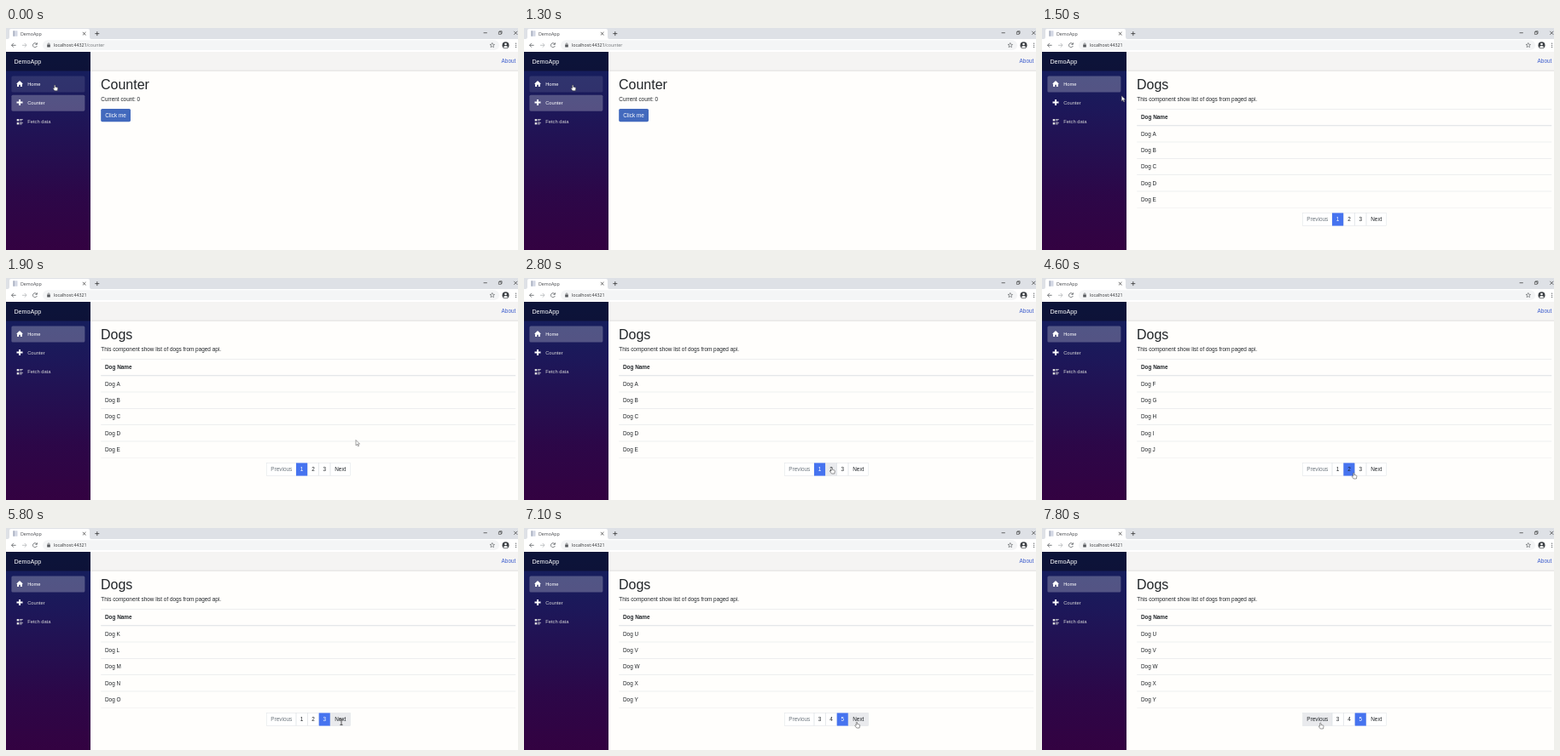
These frames come from a looping animation (600 px wide and 261 px high, 8000 ms). An HTML page with a canvas:

```html
<!DOCTYPE html>
<html lang="en">
<head>
<meta charset="utf-8">
<title>Dogs</title>
<style>
html, body { margin: 0; width: 100%; height: 100%; overflow: hidden; background: #fffefc; }
canvas { display: block; width: 600px; height: 261px; }
</style>
</head>
<body>
<canvas id="stage"></canvas>
<script>
const W = 600, H = 261, LOOP = 8000, STEP = 100;
const UI = '"Open Sans", "Noto Sans", sans-serif';
const SANS = '"Liberation Sans", Arial, sans-serif';
const INK = '#212529';
const canvas = document.getElementById('stage');
const ctx = canvas.getContext('2d');
const dpr = window.devicePixelRatio || 1;
canvas.width = W * dpr;
canvas.height = H * dpr;

// [time, page]; page 0 is the counter
const pages = [[0, 0], [1400, 1], [3000, 2], [5200, 3], [6000, 4], [6400, 5]];

// [time, x, y, pointer shape from here on]
const route = [
  [0, 56.5, 66.8, 'hand'], [1400, 56.5, 66.8, 'arrow'],
  [1900, 410, 190.5, 'arrow'], [2600, 360, 223, 'hand'],
  [3000, 360, 223, 'arrow'], [3400, 375, 233, 'arrow'],
  [3700, 371.5, 230, 'arrow'], [4100, 379, 233, 'hand'],
  [4600, 364.6, 229, 'hand'], [5100, 373, 226, 'hand'],
  [5300, 373, 226, 'hand'], [5600, 393, 228, 'ibeam'],
  [7000, 393, 228, 'hand'], [7700, 325.7, 229, 'hand'],
  [LOOP, 325.7, 229, 'hand']
];

function rect(x, y, w, h, fill, r = 0) {
  ctx.fillStyle = fill;
  ctx.beginPath();
  ctx.roundRect(x, y, w, h, r);
  ctx.fill();
}

function text(s, x, y, size, color, font = SANS, weight = 400) {
  ctx.font = `${weight} ${size}px ${font}`;
  ctx.fillStyle = color;
  ctx.fillText(s, x, y);
}

function stroke(d, color, width = 0.8) {
  ctx.strokeStyle = color;
  ctx.lineWidth = width;
  ctx.stroke(new Path2D(d));
}

function fill(d, color) {
  ctx.fillStyle = color;
  ctx.fill(new Path2D(d));
}

function dot(x, y, r, color) {
  rect(x - r, y - r, 2 * r, 2 * r, color, r);
}

function pageAt(t) {
  return pages.filter(p => p[0] <= t).pop()[1];
}

function pointerAt(t) {
  const i = route.findIndex(k => k[0] > t) - 1;
  const [t0, x0, y0, shape] = route[i];
  const [t1, x1, y1] = route[i + 1];
  const u = (t - t0) / (t1 - t0);
  const e = u * u * (3 - 2 * u);
  return { x: x0 + (x1 - x0) * e, y: y0 + (y1 - y0) * e, shape };
}

function browser(path) {
  rect(0, 0, W, 13, '#dee1e6');
  fill('M2 13Q4 13 4 10V3Q4 1 6 1H96Q98 1 98 3V10Q98 13 100 13Z', '#fff');
  rect(8.5, 3.3, 5, 6.4, '#d3d8e4', 0.5);
  rect(8.5, 3.3, 1.2, 6.4, '#9aa3b5');
  text('DemoApp', 17, 8.6, 5.3, '#45484c', UI);
  stroke('M89.9 4.8l3.6 3.6m0-3.6l-3.6 3.6', '#444');
  stroke('M104.3 6.6h5m-2.5-2.5v5', '#333');
  stroke('M559.6 5.7h4.2', '#333', 0.7);
  stroke('M577.4 4.6h2.8v2.8h-2.8zM578.3 4.6v-0.9h2.8v2.8h-0.9', '#333', 0.6);
  stroke('M595.3 3.8l4 4m0-4l-4 4', '#333', 0.7);

  rect(0, 13, W, 15, '#fff');
  rect(43, 14.3, 535, 11.8, '#f4f5f6', 5.9);
  stroke('M11.6 20.3h-5m2.3-2.4l-2.4 2.4l2.4 2.4', '#55585c');
  stroke('M19 20.3h5m-2.3-2.4l2.4 2.4l-2.4 2.4', '#b3b5b8');
  stroke('M36.1 18.9a2.5 2.5 0 1 0 0.2 2.2M36.4 17.3v2h-2', '#55585c');
  rect(48.2, 19.6, 3.6, 3, '#55585c', 0.4);
  stroke('M49 19.8v-1a1 1 0 0 1 2 0v1', '#55585c', 0.6);
  text('localhost:44321', 56, 22.2, 5.25, '#2c2e31', UI);
  if (path) {
    const w = ctx.measureText('localhost:44321').width;
    text(path, 56 + w, 22.2, 5.25, '#6d7074', UI);
  }
  stroke('M569.8 17.4l0.8 1.9l2 0.1l-1.6 1.3l0.5 2l-1.7-1.1l-1.7 1.1l0.5-2l-1.6-1.3l2-0.1z', '#5a5d61', 0.6);
  dot(585.5, 20.3, 4, '#3c4045');
  dot(585.5, 19, 1.3, '#fff');
  fill('M583 22.7q0-1.7 2.5-1.7t2.5 1.7q-2.5 1.7-5 0z', '#fff');
  for (const y of [18.2, 20.3, 22.4]) dot(597.6, y, 0.6, '#55585c');
}

function sidebar(active, homeHover) {
  const g = ctx.createLinearGradient(0, 28, 0, H);
  g.addColorStop(0, '#13215f');
  g.addColorStop(0.3, '#1d1759');
  g.addColorStop(0.72, '#2c0748');
  g.addColorStop(1, '#330241');
  rect(0, 28, 99, H - 28, g);
  rect(0, 28, 99, 22.4, 'rgba(0,0,0,.4)');
  text('DemoApp', 9.4, 41.5, 7.2, '#fff');

  if (homeHover) rect(6.4, 56.5, 86, 19, 'rgba(255,255,255,.1)', 1.6);
  rect(6.4, 56.5 + 22.2 * active, 86, 19, 'rgba(255,255,255,.25)', 1.6);
  ['Home', 'Counter', 'Fetch data'].forEach((label, i) => {
    const on = i === active || (i === 0 && homeHover);
    text(label, 25.2, 68 + 22.1 * i, 5.76, on ? '#fff' : '#d7d7d7');
  });
  fill('M16 62l4 3.8h-1.1v3.3h-2v-2.3h-1.8v2.3h-2v-3.3H12z', '#fff');
  stroke('M12.5 87.6h7m-3.5-3.5v7', '#fff', 2);
  for (const y of [107, 111]) {
    rect(12.7, y, 2.6, 2.5, '#ddd');
    rect(16.1, y, 3.6, 0.8, '#ddd');
    rect(16.1, y + 1.6, 2.6, 0.8, '#ddd');
  }
}

function counter() {
  text('Counter', 111, 72.4, 16, INK);
  text('Current count: 0', 111.3, 86.2, 6.4, INK);
  rect(111.2, 95, 34.8, 15.2, '#4269bd', 1.6);
  text('Click me', 116.3, 104.7, 6.4, '#fff');
}

function dogs(page, ptr) {
  text('Dogs', 111, 72.4, 16, INK);
  text('This component show list of dogs from paged api.', 111.3, 86.2, 6.4, INK);
  text('Dog Name', 116, 107.1, 6.4, INK, SANS, 700);
  for (let i = 0; i < 7; i++) {
    rect(111.2, 95 + 19.35 * i, 486, i === 1 ? 0.8 : 0.5, i === 6 ? '#ecedee' : '#dcdfe3');
  }
  for (let i = 0; i < 5; i++) {
    const letter = String.fromCharCode(65 + (page - 1) * 5 + i);
    text('Dog ' + letter, 116, 126.8 + 19.3 * i, 6.4, INK);
  }
  pager(page, ptr);
}

function pager(page, ptr) {
  const first = Math.max(1, page - 2);
  const edges = [305.6, 340, 353.3, 366.7, 380, 403.6];
  const labels = ['Previous', first, first + 1, first + 2, 'Next'];
  const top = 217.4, high = 15.2;
  rect(305.6, top, 98, high, '#fff', 1.6);
  ctx.textAlign = 'center';
  labels.forEach((label, i) => {
    const x = edges[i], w = edges[i + 1] - x;
    const over = ptr.x >= x && ptr.x < x + w && ptr.y >= top && ptr.y < top + high;
    const on = label === page;
    if (on) rect(x, top, w, high, '#4673ef');
    else {
      if (over) rect(x, top, w, high, '#e9eaed');
      ctx.strokeStyle = '#dee2e6';
      ctx.lineWidth = 0.5;
      ctx.strokeRect(x, top, w, high);
    }
    const color = over ? INK : on ? '#fff' : i ? INK : '#6c757d';
    text(label, x + w / 2, 227.3, 6.4, color);
  });
  ctx.textAlign = 'left';
}

const shapes = {
  arrow() {
    const d = 'M0 0V6.3L1.5 5L2.5 7.3L3.5 6.9L2.5 4.6H4.5Z';
    fill(d, '#fff');
    stroke(d, '#444', 0.5);
  },
  hand() {
    const d = 'M0 0.5Q0.7-0.3 1.3 0.5V2.5L3.6 3Q4.4 3.2 4.3 4.2L3.8 7H0.5L-1.5 4.3Q-1.2 3.4 0 4.1Z';
    fill(d, '#fff');
    stroke(d, '#333', 0.5);
  },
  ibeam() {
    stroke('M-1.6-3H1.6M0-3V3.4M-1.6 3.4H1.6', '#333', 0.8);
  }
};

function draw(t) {
  const page = pageAt(t), ptr = pointerAt(t);
  ctx.setTransform(dpr, 0, 0, dpr, 0, 0);
  rect(0, 0, W, H, '#fffefc');
  browser(page ? '' : '/counter');
  rect(99, 28, W - 99, 22, '#f5f4f3');
  rect(99, 49.8, W - 99, 0.6, '#d6d5d5');
  text('About', 580.6, 41.2, 6.4, '#3b5ccd');
  sidebar(page ? 0 : 1, !page);
  if (page) dogs(page, ptr);
  else counter();
  ctx.translate(ptr.x, ptr.y);
  shapes[ptr.shape]();
}

const start = performance.now();
function tick() {
  const t = (performance.now() - start) % LOOP;
  draw(Math.floor(t / STEP) * STEP);
  requestAnimationFrame(tick);
}
tick();
</script>
</body>
</html>
```
